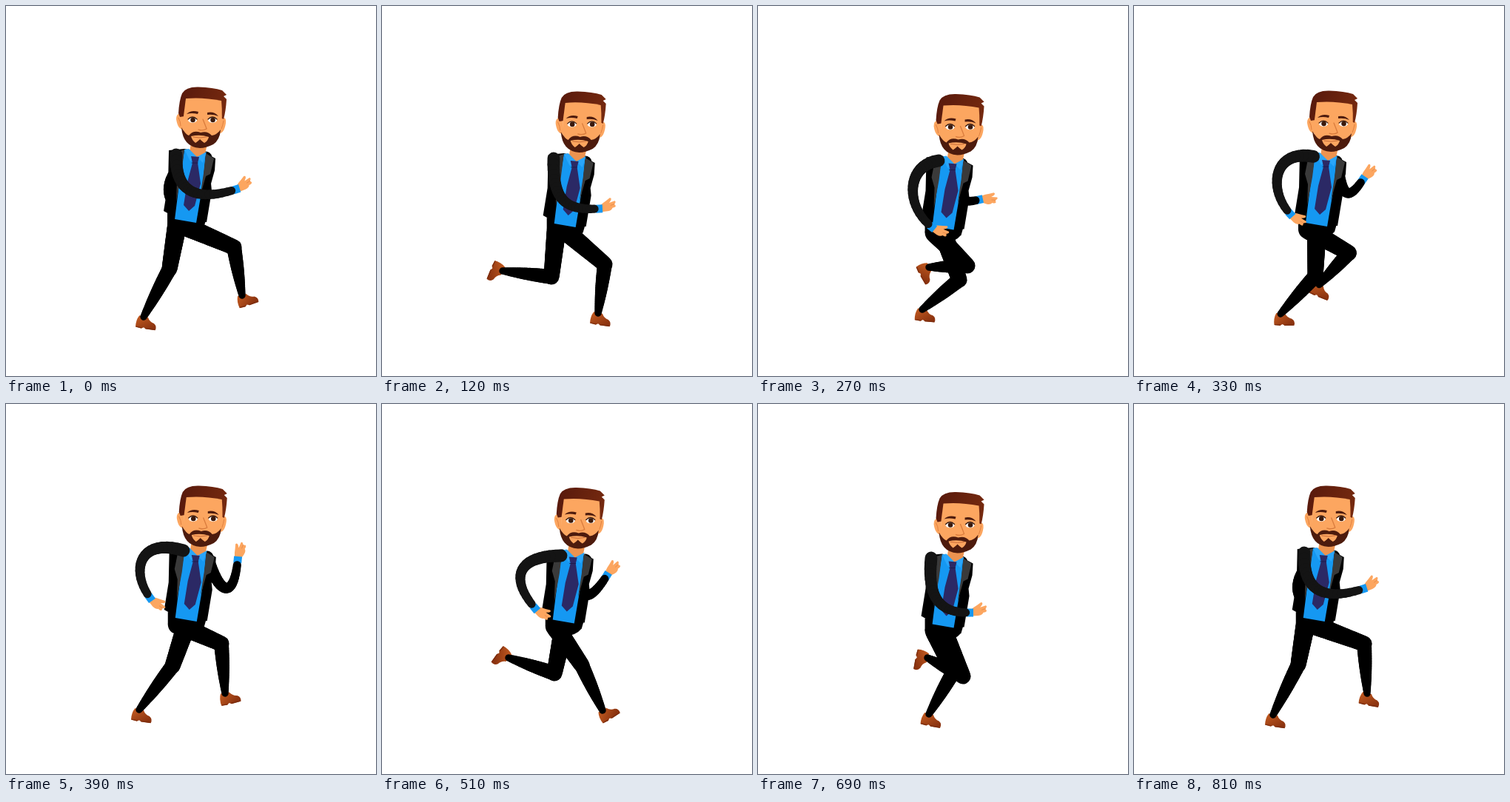
An HTML page with a canvas for the animation above (840 ms loop, 500 px wide and 500 px high).

```html
<!DOCTYPE html>
<html>
<head>
<meta charset="utf-8">
<style>
html, body { margin: 0; width: 100%; height: 100%; overflow: hidden; background: #fff; }
canvas { display: block; width: 500px; height: 500px; }
</style>
</head>
<body>
<canvas id="stage" width="500" height="500"></canvas>
<script>
const ctx = document.getElementById('stage').getContext('2d');
const LOOP = 840, STEP = 30;
const TIMES = [0, 120, 270, 390, 510, 690, 810];
const BLACK = '#000', SLEEVE = '#141414', BLUE = '#1598f2', SKIN = '#fca660', BEARD = '#4d1b0d';

// Leg poses: knee x, y, ankle x, y, shoe angle
const legs = [
  { hip: [231, 297], poses: [
    [221, 355, 186, 420, 8], [229, 366, 163, 358, 112], [283, 351, 231, 353, 60],
    [291, 324, 296, 391, -15], [270, 353, 298, 414, -33], [264, 362, 231, 419, 10],
    [222, 352, 188, 420, 8]] },
  { hip: [243, 298], poses: [
    [308, 326, 319, 391, -20], [301, 349, 292, 415, 8], [272, 370, 222, 410, 5],
    [225, 354, 180, 413, 8], [233, 364, 171, 343, 125], [277, 368, 229, 343, 100],
    [311, 324, 315, 391, 10]] }
];
// Arm poses: the four points of a cubic from shoulder to wrist
const nearArm = [
  [230, 201, 228, 258, 265, 262, 310, 248], [232, 206, 230, 265, 250, 276, 292, 274],
  [244, 209, 200, 215, 199, 270, 234, 298], [240, 198, 180, 180, 168, 225, 194, 261],
  [242, 205, 183, 205, 172, 235, 206, 275], [234, 208, 228, 265, 248, 282, 285, 282],
  [230, 201, 228, 260, 265, 264, 309, 250]];
const farArm = [
  [270, 205, 209, 210, 209, 275, 240, 270], [275, 211, 235, 230, 225, 275, 250, 275],
  [275, 214, 265, 250, 262, 270, 298, 262], [272, 207, 290, 262, 308, 262, 313, 212],
  [275, 211, 262, 278, 285, 262, 303, 233], [275, 214, 240, 235, 230, 275, 258, 275],
  [270, 206, 210, 210, 210, 275, 242, 270]];

const mix = (a, b, k) => a + (b - a) * k;

function body(t) {
  const k = (1 - Math.cos((t - 10) / 420 * 2 * Math.PI)) / 2;
  return [8.7 * k, 11 * k];
}

// Periodic cubic spline through the poses
function sample(poses, t) {
  const n = TIMES.length;
  const at = i => ({ t: TIMES[(i + n) % n] + Math.floor(i / n) * LOOP, v: poses[(i + n) % n] });
  let i = n - 1;
  while (TIMES[i] > t) i--;
  const [a, b, c, d] = [at(i - 1), at(i), at(i + 1), at(i + 2)];
  const span = c.t - b.t, u = (t - b.t) / span, w = 1 - u;
  return b.v.map((p, j) => {
    const m0 = (c.v[j] - a.v[j]) / (c.t - a.t) * span;
    const m1 = (d.v[j] - b.v[j]) / (d.t - b.t) * span;
    return (1 + 2 * u) * w * w * p + u * w * w * m0 + u * u * (3 - 2 * u) * c.v[j] - u * u * w * m1;
  });
}

// Store legs as bone angles and lengths so the joints swing on arcs
for (const leg of legs) {
  leg.polar = leg.poses.map(([kx, ky, ax, ay, turn], i) => {
    const [bx, by] = body(TIMES[i]);
    const hx = leg.hip[0] + bx, hy = leg.hip[1] + by;
    return [Math.atan2(kx - hx, ky - hy), Math.hypot(kx - hx, ky - hy),
      Math.atan2(ax - kx, ay - ky), Math.hypot(ax - kx, ay - ky), turn];
  });
}

function shape(d, fill) {
  ctx.fillStyle = fill;
  ctx.fill(new Path2D(d));
}

function line(d, color, width) {
  ctx.strokeStyle = color;
  ctx.lineWidth = width;
  ctx.lineCap = 'round';
  ctx.stroke(new Path2D(d));
}

function gradient(x0, y0, x1, y1, from, to) {
  const g = ctx.createLinearGradient(x0, y0, x1, y1);
  g.addColorStop(0, from);
  g.addColorStop(1, to);
  return g;
}

function placed(x, y, angle, draw) {
  ctx.save();
  ctx.translate(x, y);
  ctx.rotate(angle);
  draw();
  ctx.restore();
}

function tube(point, width, color) {
  const n = 20;
  ctx.strokeStyle = color;
  ctx.lineCap = 'round';
  for (let i = 0; i < n; i++) {
    ctx.lineWidth = width((i + 0.5) / n);
    ctx.beginPath();
    ctx.moveTo(...point(i / n));
    ctx.lineTo(...point((i + 1) / n));
    ctx.stroke();
  }
}

function bone(x0, y0, x1, y1, width) {
  tube(k => [mix(x0, x1, k), mix(y0, y1, k)], width, BLACK);
}

function drawShoe() {
  shape('M-6 -1L6 0Q9 6 15 7Q20 10 18 16L5 16L2 14L-1 16L-9 15Q-10 6 -6 -1Z',
    gradient(-4, 0, 8, 17, '#bd571f', '#8c3410'));
  line('M-8 14.5L-1 15M5 15.2L17 15.2', '#7a2c0e', 1.2);
}

function drawLeg(leg, t, bx, by) {
  const [thigh, thighLen, shin, shinLen, turn] = sample(leg.polar, t);
  const hx = leg.hip[0] + bx, hy = leg.hip[1] + by;
  const kx = hx + Math.sin(thigh) * thighLen, ky = hy + Math.cos(thigh) * thighLen;
  const ax = kx + Math.sin(shin) * shinLen, ay = ky + Math.cos(shin) * shinLen;
  placed(ax, ay, turn * Math.PI / 180, drawShoe);
  bone(hx, hy, kx, ky, k => mix(26, 21, k));
  bone(kx, ky, ax, ay, k => mix(20, 9, k) + 2 * Math.sin(k * Math.PI));
}

function drawArm(poses, t, color, bend, flip) {
  const [x0, y0, x1, y1, x2, y2, x3, y3] = sample(poses, t);
  const cubic = (a, b, c, d, k) => {
    const w = 1 - k;
    return w * w * w * a + 3 * w * w * k * b + 3 * w * k * k * c + k * k * k * d;
  };
  const dir = Math.atan2(y3 - y2, x3 - x2);
  placed(x3 + 5 * Math.cos(dir), y3 + 5 * Math.sin(dir), dir + bend, () => {
    ctx.scale(1, flip);
    shape('M-2 -4Q4 -7 9 -8L15 -10Q18 -9 15 -6L12 -4L20 -4Q22 -2 18 0L19 3Q18 5 14 4Q12 7 6 6L-2 4Z', SKIN);
    line('M13 0L18 0', '#e58a4a', 0.8);
  });
  placed(x3, y3, dir, () => shape('M-3 -5.5L6 -5.5L6 5.5L-3 5.5Z', BLUE));
  ctx.save();
  tube(k => {
    const s = k * 0.96;
    return [cubic(x0, x1, x2, x3, s), cubic(y0, y1, y2, y3, s)];
  }, k => mix(17, 11, k), color);
  ctx.restore();
}

function drawTorso() {
  shape('M218 280L271 286L267 300Q258 311 240 310Q220 308 218 296Z', BLACK);
  shape('M220 195L241 193L270 199L283 206L282 222L277 240L278 250L271 292L238 291L213 277L219 240Z', BLACK);
  shape('M241 194L270 200L266 240L257 293L228 288L234 240Z', BLUE);
  shape('M232 197L241 194L237 226L230 264L231 236L227 222Z', '#3a3a3a');
  shape('M270 199L281 206L276 227L270 230L262 258L267 226Z', '#3a3a3a');
  shape('M250 184L272 186L269 200L258 204L248 198Z', '#ec9350');
  shape('M241 194L247 193L257 203L249 210Z M271 197L266 212L258 204Z', '#2aa6fa');
  shape('M250 203L261 204L259 212L263 240L255 270L247 277L240 269L245 238L252 212Z', '#2b2965');
  line('M251 212L259 212', '#1d1c4c', 1);
}

function drawEye(x, y) {
  ctx.fillStyle = '#fff';
  ctx.beginPath();
  ctx.ellipse(x, y, 6, 3.8, 0, 0, 7);
  ctx.fill();
  ctx.fillStyle = '#3b1a0c';
  ctx.beginPath();
  ctx.arc(x + 0.5, y, 3.3, 0, 7);
  ctx.fill();
  line(`M${x - 6} ${y - 1}Q${x} ${y - 7} ${x + 6} ${y - 1}`, '#3b1a0c', 1.3);
}

function drawHead() {
  shape('M240 147Q230 142 230 153Q232 167 240 167Z M291 151Q298 149 297 158Q295 172 288 172Z', SKIN);
  line('M233 151Q236 156 236 162M294 155Q293 161 291 166', '#e0803f', 1);
  shape('M235 150L233 145Q234 127 238 118Q243 109 260 109.5Q280 110 292 114L298 120L294 122L298 126Q297 142 294 153L288 150L286 128L244 126L241 149Z',
    gradient(235, 112, 298, 130, '#57190c', '#75290f'));
  shape('M243 125Q266 123 291 128Q293 150 290 170Q284 188 262 190Q243 186 239 166L240 148Z', SKIN);
  shape('M237 164Q243 174 247 175Q253 167 263 171Q272 168 278 175Q285 174 290 167Q289 181 280 187Q270 192 262 192Q250 191 244 184Q238 177 237 164Z', BEARD);
  shape('M250 176Q262 173 274 177Q273 182 268 185L262 181L256 185Q251 181 250 176Z', SKIN);
  shape('M256 186L262 180L268 186Z', BEARD);
  line('M253 177Q262 179 271 177', '#c76a38', 1);
  line('M266 153Q270 163 271 166Q266 169 260 167', '#d97c3d', 1.3);
  drawEye(252, 154);
  drawEye(279, 154);
  shape('M244 146Q250 140 260 143L259 146Q251 144 244 146Z M272 144Q281 142 287 149Q280 146 272 147Z', BEARD);
}

function render(now) {
  const t = Math.floor(now % LOOP / STEP) * STEP;
  const [bx, by] = body(t);
  ctx.fillStyle = '#fff';
  ctx.fillRect(0, 0, 500, 500);
  drawArm(farArm, t, BLACK, 0.3, 1);
  for (const leg of legs) drawLeg(leg, t, bx, by);
  placed(bx, by, 0, drawTorso);
  drawArm(nearArm, t, SLEEVE, -0.3, 1);
  placed(bx, by, 0, drawHead);
}

const start = performance.now();
function tick() {
  render(performance.now() - start);
  requestAnimationFrame(tick);
}
tick();
</script>
</body>
</html>
```
